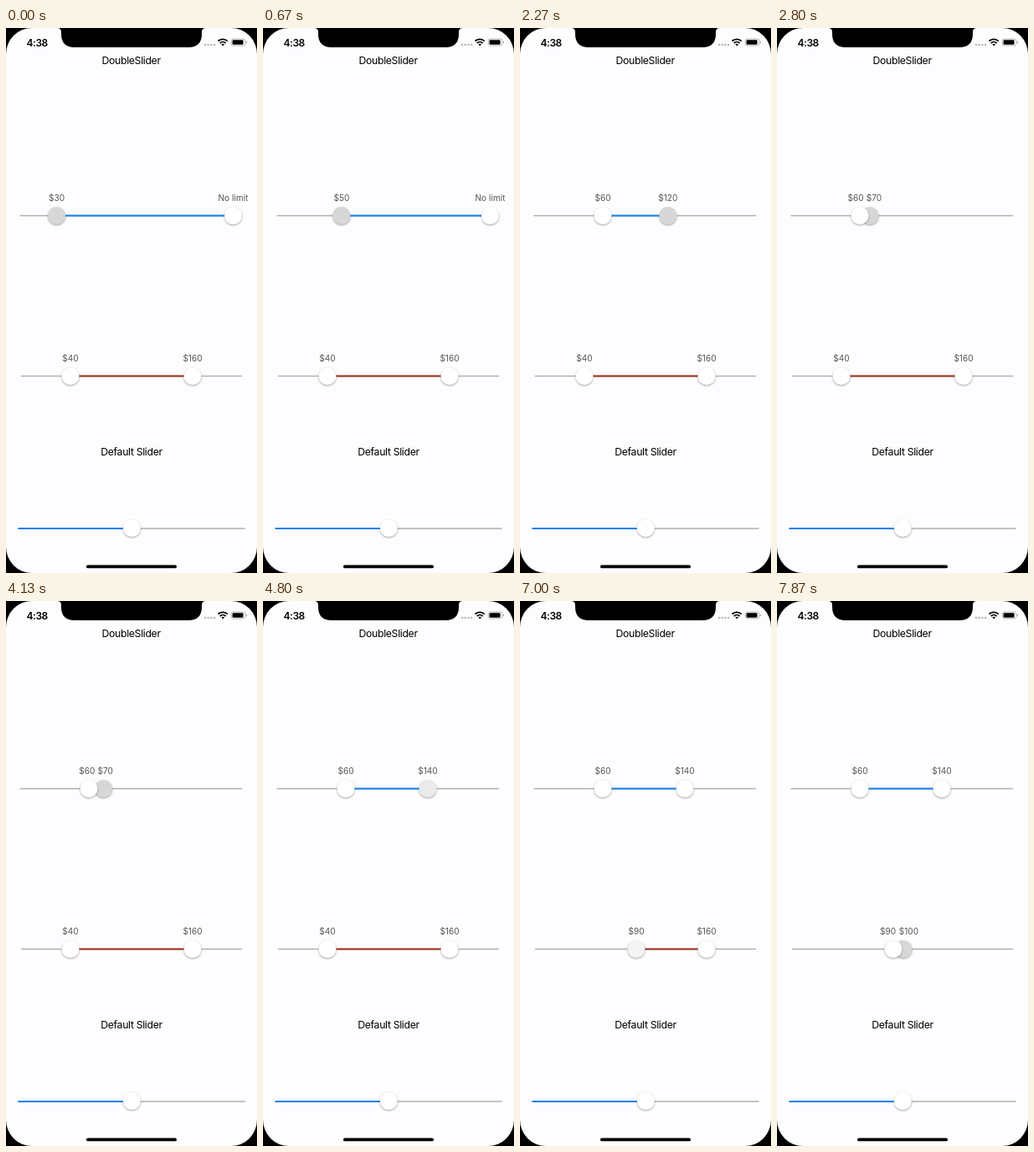
Animation of 300x649 px, one loop 8 s. Source, as an HTML page:

```html
<!DOCTYPE html>
<html lang="en">
<head>
<meta charset="utf-8">
<title>DoubleSlider</title>
<style>
  html, body { margin: 0; width: 100%; height: 100%; overflow: hidden; background: #000; }
  svg { display: block; width: 300px; height: 649px; font-family: Inter, Roboto, "Liberation Sans", sans-serif; }
  .title { font-size: 12.3px; letter-spacing: -.35px; text-anchor: middle; }
  .clock { font-size: 12px; font-weight: 600; letter-spacing: -.45px; }
  .label { font-size: 10.1px; fill: #555; text-anchor: middle; }
  .track { stroke: #b0b0b2; stroke-width: 1.7; stroke-linecap: round; }
  .fill { stroke-width: 1.8; stroke-linecap: round; }
  .thumb { filter: drop-shadow(0 1.3px 1.2px rgba(0, 0, 0, .36)); }
</style>
</head>
<body>
<svg id="stage" viewBox="0 0 300 649">
  <rect width="300" height="649" fill="#000"/>
  <rect width="300" height="649" rx="31" fill="#fdfcfe"/>
  <path d="M61 0Q66 0 66 5V7Q66 23 82 23H218Q234 23 234 7V5Q234 0 239 0Z"/>

  <text class="clock" x="24.5" y="21.5">4:38</text>
  <g fill="#b9b9bb">
    <circle cx="238" cy="20" r="1.3"/><circle cx="241.7" cy="20" r="1.3"/>
    <circle cx="245.4" cy="20" r="1.3"/><circle cx="249.1" cy="20" r="1.3"/>
  </g>
  <g fill="none" stroke="#000" stroke-width="1.8">
    <path d="M253.6 15.7A8 8 0 0 1 264.8 15.7"/>
    <path d="M255.8 18A4.9 4.9 0 0 1 262.6 18"/>
  </g>
  <path d="M257.4 19.6A2.6 2.6 0 0 1 261 19.6L259.2 21.4Z"/>
  <rect x="269.3" y="13" width="16.6" height="8" rx="2.3" fill="none" stroke="#a5a5a7" stroke-width=".8"/>
  <rect x="270.6" y="14.3" width="13" height="5.4" rx="1.2"/>
  <path d="M286.9 15.6Q288.2 16 288.2 17T286.9 18.4Z" fill="#a5a5a7"/>

  <text class="title" x="149.6" y="42.7">DoubleSlider</text>
  <text class="title" x="150" y="509.2">Default Slider</text>
  <g id="sliders"></g>
  <rect x="96" y="639.6" width="108" height="3.7" rx="1.85"/>
</svg>
<script>
const LOOP = 8000, MIN_GAP = 3;
const root = document.getElementById("sliders");

// Tables of [time, value]; press is 1 while a thumb is held.
const configs = [
  { y: 223.5, from: 17.2, to: 281.5, min: 27.5, max: 271.5, color: "#1480ee",
    low:  { path: [[0, 60.5], [870, 99]], press: [[870, 1], [1000, 0]] },
    high: { path: [[1540, 271.5], [1730, 233.5], [2400, 163], [2800, 111], [3150, 111],
                   [3600, 137], [3930, 116.5], [4130, 116.5], [4760, 197]],
            press: [[1530, 0], [1660, 1], [4740, 1], [4870, 0]] } },
  { y: 414.5, from: 18.5, to: 281.5, min: 28, max: 272, color: "#a0301a",
    low:  { path: [[5470, 77], [5800, 172.5], [6070, 211], [6350, 211], [6880, 139]],
            press: [[5470, 0], [5600, 1], [6870, 1], [7000, .28], [7400, .28], [7470, 0]] },
    high: { path: [[7410, 223], [7870, 151]], press: [[7400, 0], [7530, 1]] } }
];

function make(tag, attrs) {
  const el = document.createElementNS("http://www.w3.org/2000/svg", tag);
  for (const k in attrs) el.setAttribute(k, attrs[k]);
  return root.appendChild(el);
}
const line = (cls, x1, x2, y, stroke) =>
  make("line", { class: cls, x1, x2, y1: y, y2: y, ...(stroke && { stroke }) });
const thumb = (x, y) => make("circle", { class: "thumb", cx: x, cy: y, r: 10.5, fill: "#fff" });

// Interpolates a table; smooth mode uses monotone cubic tangents.
function sample(keys, t, smooth) {
  const last = keys.length - 1;
  if (t <= keys[0][0]) return keys[0][1];
  if (t >= keys[last][0]) return keys[last][1];
  const i = keys.findIndex(k => k[0] > t) - 1;
  const [t0, a] = keys[i], [t1, b] = keys[i + 1];
  const d = t1 - t0, u = (t - t0) / d;
  if (!smooth) return a + (b - a) * u;
  const slope = j => (keys[j + 1][1] - keys[j][1]) / (keys[j + 1][0] - keys[j][0]);
  const tangent = j => {
    if (j === 0 || j === last) return 0;
    const p = slope(j - 1), q = slope(j);
    return p * q > 0 ? 2 * p * q / (p + q) : 0;
  };
  const v = 1 - u;
  return a * v * v * (1 + 2 * u) + b * u * u * (3 - 2 * u)
    + d * u * v * (v * tangent(i) - u * tangent(i + 1));
}

function caption(c, x) {
  const value = Math.round((x - c.min) / (c.max - c.min) * 20) * 10;
  return value >= 200 ? "No limit" : "$" + value;
}
const widthOf = text => text.length > 4 ? 36 : text.length * 5.5 + 2.5;

function doubleSlider(c) {
  line("track", c.from, c.to, c.y);
  const fill = line("fill", 0, 0, c.y, c.color);
  const high = thumb(0, c.y), low = thumb(0, c.y);
  const labels = [0, 1].map(() => make("text", { class: "label", y: c.y - 17.8 }));

  function place(el, part, t) {
    const x = sample(part.path, t, true);
    const shade = Math.round(255 - 40 * sample(part.press, t));
    el.setAttribute("cx", x);
    el.setAttribute("fill", `rgb(${shade},${shade},${shade})`);
    return x;
  }

  return t => {
    const a = place(low, c.low, t), b = place(high, c.high, t);
    fill.setAttribute("x1", a);
    fill.setAttribute("x2", b);
    const texts = [caption(c, a), caption(c, b)];
    const room = (widthOf(texts[0]) + widthOf(texts[1])) / 2 + MIN_GAP;
    const push = Math.max(0, (room - (b - a)) / 2);
    [a - push, b + push].forEach((x, i) => {
      labels[i].setAttribute("x", x);
      labels[i].textContent = texts[i];
    });
  };
}

const updates = configs.map(doubleSlider);
line("track", 15.2, 285, 596);
line("fill", 15.2, 150, 596, "#1480ee");
thumb(150.3, 595.5);

const start = performance.now();
function frame(now) {
  const t = Math.max(0, now - start) % LOOP;
  updates.forEach(update => update(t));
  requestAnimationFrame(frame);
}
frame(start);
</script>
</body>
</html>
```
